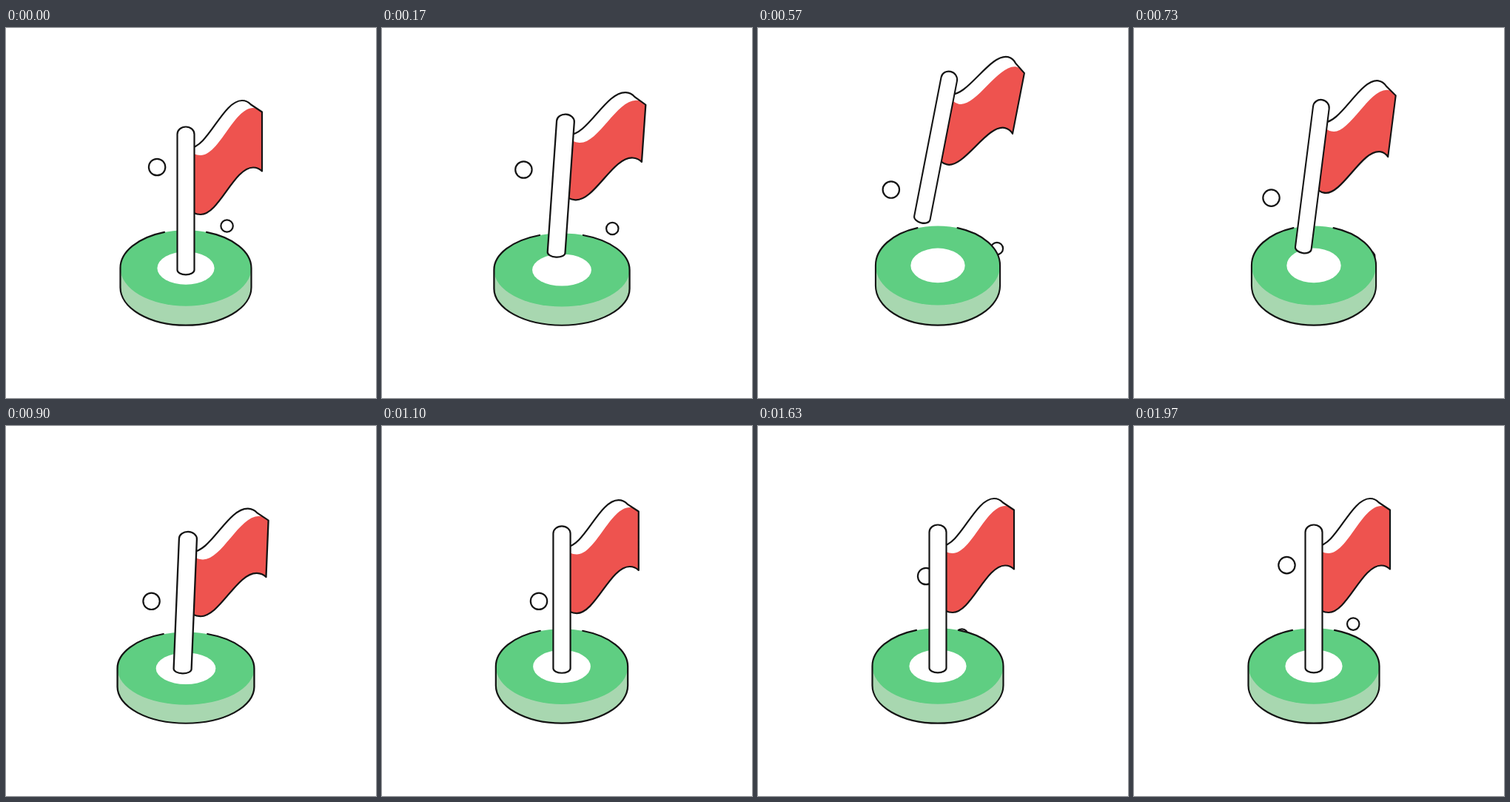
An HTML page that plays this animation: 500x500 px, repeating every 2000 ms.

```html
<!DOCTYPE html>
<html lang="en">
<head>
<meta charset="utf-8">
<title>Flag</title>
<style>
  html, body { margin: 0; width: 100%; height: 100%; overflow: hidden; background: #fff; }
  svg { display: block; width: 100vw; height: 100vh; }
  .line { fill: none; stroke: #141414; stroke-width: 2.2; stroke-linejoin: round; stroke-linecap: round; }
  .white { fill: #fff; }
  .red { fill: #ee534f; }
  .green { fill: #5fce82; }
  .pale { fill: #a8d7b0; }
</style>
</head>
<body>
<svg viewBox="0 0 500 500">
  <circle id="left" class="line white" r="11.2"/>
  <circle id="right" class="line white" r="8.2"/>
  <g id="body">
    <path class="pale" d="M154.5 324.5V350.5A88.5 51.2 0 0 0 331.5 350.5V324.5Z"/>
    <ellipse class="green" cx="243" cy="324.5" rx="88.5" ry="51.2"/>
    <ellipse class="white" cx="243" cy="324.5" rx="38.6" ry="22.3"/>
    <path class="line" d="M271 275.9A88.5 51.2 0 0 1 331.5 324.5V350.5A88.5 51.2 0 0 1 154.5 350.5V324.5A88.5 51.2 0 0 1 214 275.9"/>
    <g id="flag">
      <path class="white" d="M248 162C273 162 293 98 319 98Q326 98 331 103.5L346 113.5L300 150L254 175Z"/>
      <path class="red" d="M254 170Q258 172 263 172C288 172 308 108 334 108Q341 108 346 113.5V193.5Q341 188.5 334 188.5C308 188.5 288 252 263 252Q258 252 254 250Z"/>
      <path class="line" d="M248 162C273 162 293 98 319 98Q326 98 331 103.5L346 113.5V193.5Q341 188.5 334 188.5C308 188.5 288 252 263 252Q258 252 254 250"/>
      <path class="line white" d="M231.5 143.5A11.5 10 0 0 1 254.5 143.5V327A11.5 6.3 0 0 1 231.5 327Z"/>
    </g>
  </g>
</svg>
<script>
  const LOOP = 2000;
  const el = id => document.getElementById(id);
  const [left, right, body, flag] = ['left', 'right', 'body', 'flag'].map(el);

  // Each track lists [time in ms, value].
  const stretch = [[0, 0], [290, .055], [500, -.05], [740, -.05], [940, .055], [1150, 0], [LOOP, 0]];
  const lift = [[0, 0], [400, -60], [480, -60], [870, 0], [LOOP, 0]];
  const tilt = [[0, 0], [470, 12.4], [520, 12.4], [1040, 0], [LOOP, 0]];

  function at(track, t) {
    const i = track.findIndex(key => key[0] > t);
    const [t0, a] = track[i - 1], [t1, b] = track[i];
    const p = (t - t0) / (t1 - t0);
    return a + (b - a) * p * p * (3 - 2 * p);
  }

  function orbit(dot, cx, cy, dir, angle) {
    dot.setAttribute('cx', cx + dir * 25 * Math.sin(angle));
    dot.setAttribute('cy', cy - 25 * Math.cos(angle));
  }

  function draw() {
    const t = performance.now() % LOOP;
    const angle = t / LOOP * 2 * Math.PI;
    orbit(left, 204.2, 213, -1, angle);
    orbit(right, 298.5, 292.5, 1, angle);

    const k = at(stretch, t);
    body.setAttribute('transform', `translate(243 402) scale(${1 + k} ${1 - .92 * k}) translate(-243 -402)`);
    flag.setAttribute('transform', `translate(0 ${at(lift, t)}) rotate(${at(tilt, t)} 289 215.5)`);
    requestAnimationFrame(draw);
  }
  draw();
</script>
</body>
</html>
```
